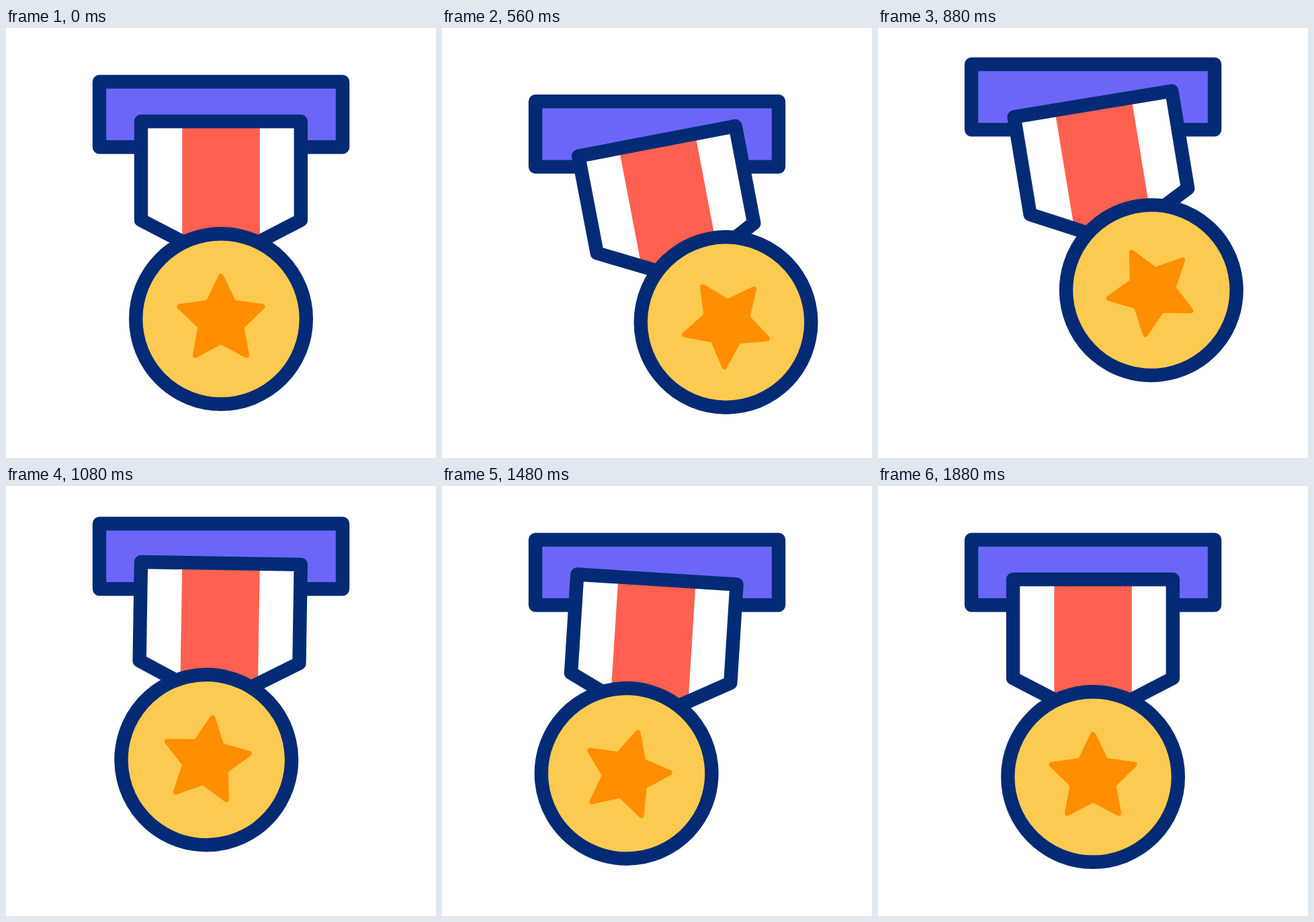
Animation of 640 by 640 pixels, one loop 2000 ms. Source, as an HTML page:

```html
<!DOCTYPE html>
<html lang="en">
<head>
<meta charset="utf-8">
<title>Swinging medal</title>
<style>
  html, body { margin: 0; width: 100%; height: 100%; overflow: hidden; background: #fff; }
  svg { display: block; width: 100vw; height: 100vh; }
  .line { stroke: #032b75; stroke-width: 20.4; stroke-linejoin: round; }
</style>
</head>
<body>
<svg viewBox="0 0 640 640">
  <g id="badge">
    <rect class="line" x="139" y="80" width="362" height="97.3" fill="#6b66f8"/>
    <g id="ribbon">
      <path d="M201 139H438.8V286L320 347.5L201 286Z" fill="#fff"/>
      <path d="M262.3 139H377.8V317.5L320 347.5L262.3 317.5Z" fill="#ff6150"/>
      <path class="line" d="M201 139H438.8V286L320 347.5L201 286Z" fill="none"/>
      <g id="medal">
        <circle class="line" cx="320" cy="433" r="126.8" fill="#fcca50"/>
        <path id="star" fill="#ff8e00" stroke="#ff8e00" stroke-width="8" stroke-linejoin="round"/>
      </g>
    </g>
  </g>
</svg>
<script>
const LOOP = 2000, STEP = 40;
const el = id => document.getElementById(id);

// Tracks are lists of [time, value]
const LIFT = [[0, 0], [533, 30], [967, -32.5], [1305, 0]];
const SWING = [[67, 0], [733, -13], [1258, 6], [1770, 0]];
const TWIST = [[67, 0], [733, -27], [1258, 20], [1770, 0]];

const ease = u => u * u * (3 - 2 * u);

function valueAt(track, t) {
  if (t <= track[0][0]) return track[0][1];
  for (let i = 1; i < track.length; i++) {
    const [t0, v0] = track[i - 1], [t1, v1] = track[i];
    if (t < t1) return v0 + (v1 - v0) * ease((t - t0) / (t1 - t0));
  }
  return track[track.length - 1][1];
}

function starPath(cx, cy, outer, inner) {
  const points = Array.from({ length: 10 }, (_, i) => {
    const r = i % 2 ? inner : outer, a = i * Math.PI / 5;
    return `${cx + r * Math.sin(a)} ${cy - r * Math.cos(a)}`;
  });
  return `M${points.join('L')}Z`;
}

function draw(t) {
  el('badge').setAttribute('transform', `translate(0 ${valueAt(LIFT, t)})`);
  el('ribbon').setAttribute('transform', `rotate(${valueAt(SWING, t)} 320 139)`);
  el('medal').setAttribute('transform', `rotate(${valueAt(TWIST, t)} 320 302)`);
}

el('star').setAttribute('d', starPath(320, 434.7, 64.7, 32));
draw(0);

const start = performance.now();
function tick() {
  const t = (performance.now() - start) % LOOP;
  draw(Math.floor(t / STEP) * STEP);
  requestAnimationFrame(tick);
}
requestAnimationFrame(tick);
</script>
</body>
</html>
```
